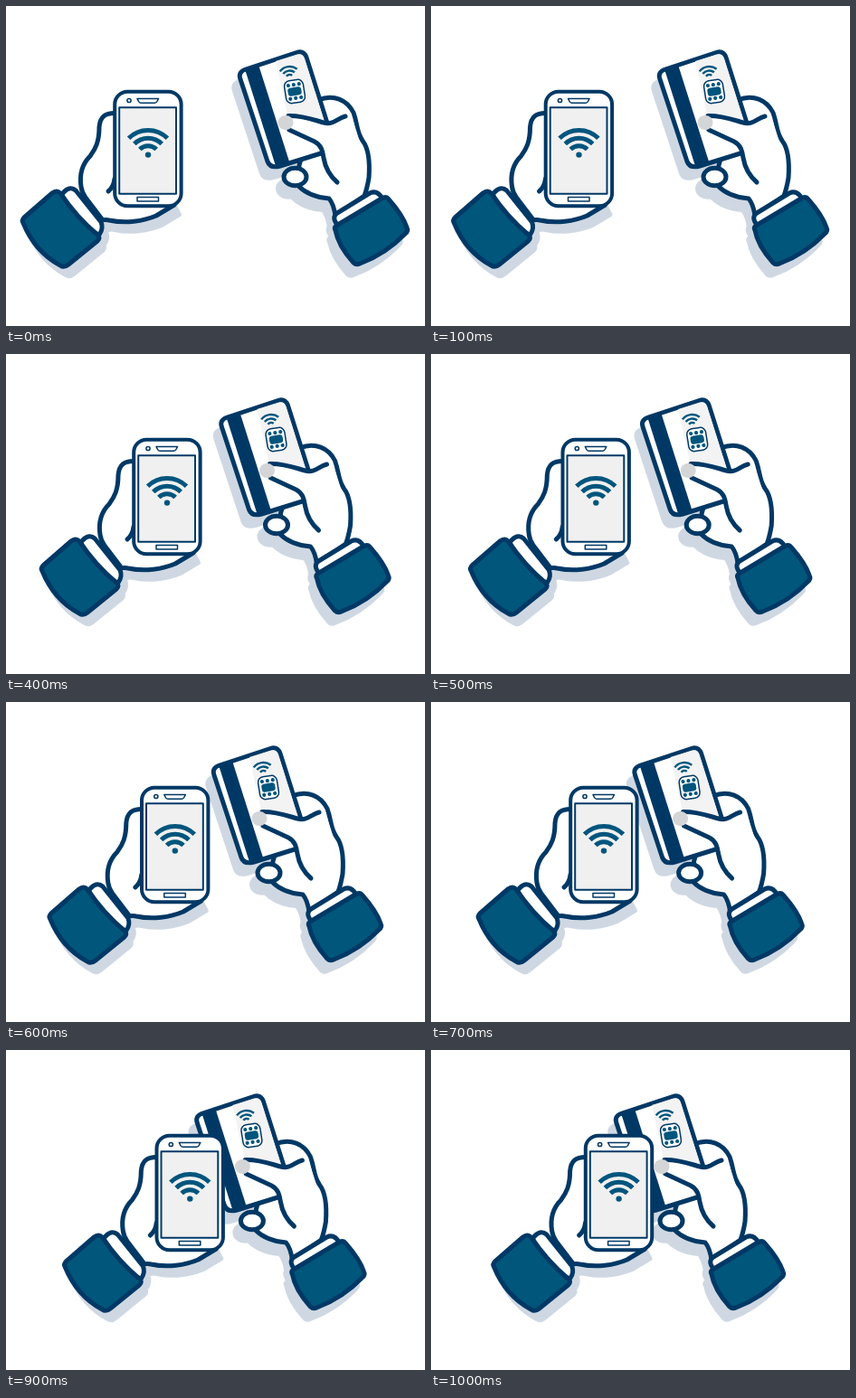
Write an HTML page that moves like this. It is 463 by 354 pixels and loops after 3000 ms.

```html
<!DOCTYPE html>
<html lang="en">
<head>
<meta charset="utf-8">
<title>Contactless payment</title>
<style>
  html, body { margin: 0; width: 100%; height: 100%; overflow: hidden; background: #fff; }
  svg { display: block; width: 100vw; height: 100vh; }
  .shape { fill: #fff; stroke: #003865; stroke-width: 5; stroke-linejoin: round; stroke-linecap: round; }
  .shadow { fill: #cfd8e2; stroke: #cfd8e2; stroke-width: 4; }
  .cloth { fill: #00567b; }
  .line { fill: none; }
  .thin { stroke-width: 1.5; }
  .plain { stroke: none; }
  .navy { fill: #003865; }
  .blue { fill: #00557d; }
  .waves { fill: none; stroke: #00557d; }
</style>
</head>
<body>
<svg viewBox="0 0 463 354">
  <defs>
    <path id="phoneHand" d="M122 118.5C109 118 104 123 103 134C103 150 99 158 93 166C84 175 81 187 83 200Q84 207 88 212L107 237Q110 236 114 237C132 241 152 238 166 232L186 220L150 150Z"/>
    <path id="phoneCuff" d="M62 208Q70 198 77 204L105 239Q108 246 103 253L70 240Z"/>
    <path id="phoneSleeve" d="M20 234L51 207Q56 203 60 207Q78 234 101 253Q105 256 101 260L69 286Q64 290 60 287Q32 272 19 240Q17 237 20 234Z"/>

    <path id="cardHand" d="M345 104C362 97 377 104 384 118C389 132 387 139 394 149C401 158 402 176 401 190Q399 202 396 210L364 232Q362 219 357 213C344 212 332 208 323 199L324 176L335 140Z"/>
    <ellipse id="finger" cx="319.5" cy="189" rx="12.5" ry="9.7"/>
    <path id="card" d="M265 70L321 51.500Q329 49 332 57L364 158L303 177Q292 180 289 172L259 81Q256 73 265 70Z"/>
    <path id="cardCuff" d="M367 243Q359 234 366 229L402 207Q410 203 416 213L400 235Z"/>
    <path id="cardSleeve" d="M365 243L415 213Q420 210 423 214Q438 231 443 245Q445 249 441 252Q420 274 391 285Q387 287 384 284Q367 265 364 248Q362 245 365 243Z"/>
  </defs>

  <g id="cardSide" class="shape">
    <g class="shadow" transform="translate(-7 13)">
      <use href="#cardHand"/><use href="#finger"/><use href="#card"/>
      <use href="#cardCuff"/><use href="#cardSleeve"/>
    </g>
    <use href="#cardHand"/>
    <use href="#finger"/>
    <use href="#card"/>
    <path class="plain" fill="#f3f3f3" d="M298 61L322 53.500Q328 52 330 58L353 131L311 120Z"/>
    <path class="plain navy" d="M264 70L279 65L313 172L298 177Z"/>
    <g class="waves" stroke-width="2.4" transform="translate(313.500 80.500) rotate(-8)" id="cardWaves"></g>
    <g transform="translate(319 94.500) rotate(-9)">
      <rect class="thin" x="-10.5" y="-12.500" width="21" height="25" rx="6"/>
      <g class="plain blue">
        <rect x="-7.5" y="-4.5" width="15" height="9" rx="3"/>
        <circle cx="-6" cy="-7.5" r="2.1"/><circle cy="-7.5" r="2.1"/><circle cx="6" cy="-7.5" r="2.1"/>
        <circle cx="-6" cy="7.5" r="2.1"/><circle cy="7.5" r="2.1"/><circle cx="6" cy="7.5" r="2.1"/>
      </g>
    </g>
    <path class="plain" d="M360 131C345 128 330 120 311 121C299 121 297 131 307 136L342 150C350 154 350 162 351 168C353 180 358 188 367 196L394 160L384 128Z"/>
    <path class="line" d="M375 122C366 124 362 132 351 129C340 126 328 121 312 121.500M313 137L341 150C349 154 350 162 351 168C353 180 358 188 366 195"/>
    <ellipse class="plain" fill="#d3d5d7" cx="309" cy="129" rx="8.500" ry="8"/>
    <use href="#cardCuff"/>
    <use href="#cardSleeve" class="cloth"/>
  </g>

  <g id="phoneSide" class="shape">
    <g class="shadow" transform="translate(6 11)">
      <use href="#phoneHand"/><use href="#phoneCuff"/><use href="#phoneSleeve"/>
    </g>
    <use href="#phoneHand"/>
    <path class="line" d="M120 191Q119 200 113 205"/>
    <use href="#phoneCuff"/>
    <use href="#phoneSleeve" class="cloth"/>
    <rect x="120.2" y="94.8" width="73.4" height="126.400" rx="14" stroke-width="4"/>
    <g class="thin">
      <rect x="125.2" y="112.2" width="62.800" height="95.500" fill="#f0f0f0" stroke-width="2"/>
      <circle cx="136" cy="104.5" r="2.1"/>
      <path d="M145 102.5h23.5l-1.5 3q-.8 1.7-2.5 1.7h-15.5q-1.8 0-2.5-1.7z"/>
      <rect x="145" y="211.5" width="23.5" height="4.5"/>
    </g>
    <g class="waves" stroke-width="5" transform="translate(157 167.7)" id="phoneWaves"></g>
    <circle class="plain blue" cx="157" cy="164.6" r="3.2"/>
  </g>
</svg>
<script>
  const byId = id => document.getElementById(id);

  // Quarter-circle signal arcs, opening upwards around the group origin.
  function drawWaves(id, radii) {
    byId(id).innerHTML = radii.map(r => {
      const d = r * Math.SQRT1_2;
      return `<path stroke-linecap="butt" d="M${-d} ${-d}A${r} ${r} 0 0 1 ${d} ${-d}"/>`;
    }).join("");
  }
  drawWaves("phoneWaves", [30.3, 21.5, 13]);
  drawWaves("cardWaves", [13.5, 9, 4.5]);

  // Travel in pixels, advancing in hard steps and then holding.
  const STEP = 100, LOOP = 3000;
  const phoneTravel = [0, 6.5, 13, 17, 21, 25.3, 29.8, 34, 42, 46.3, 50.6];
  const cardTravel = [0, 6, 12, 16.5, 20.5, 24.8, 29, 33.4, 41.6, 47.6, 54];
  const start = performance.now();

  function draw(now) {
    const elapsed = Math.max(0, now - start) % LOOP;
    const step = Math.min(phoneTravel.length - 1, Math.floor(elapsed / STEP));
    byId("phoneSide").setAttribute("transform", `translate(${phoneTravel[step]} 0)`);
    byId("cardSide").setAttribute("transform", `translate(${-cardTravel[step]} 0)`);
    requestAnimationFrame(draw);
  }
  draw(start);
</script>
</body>
</html>
```
